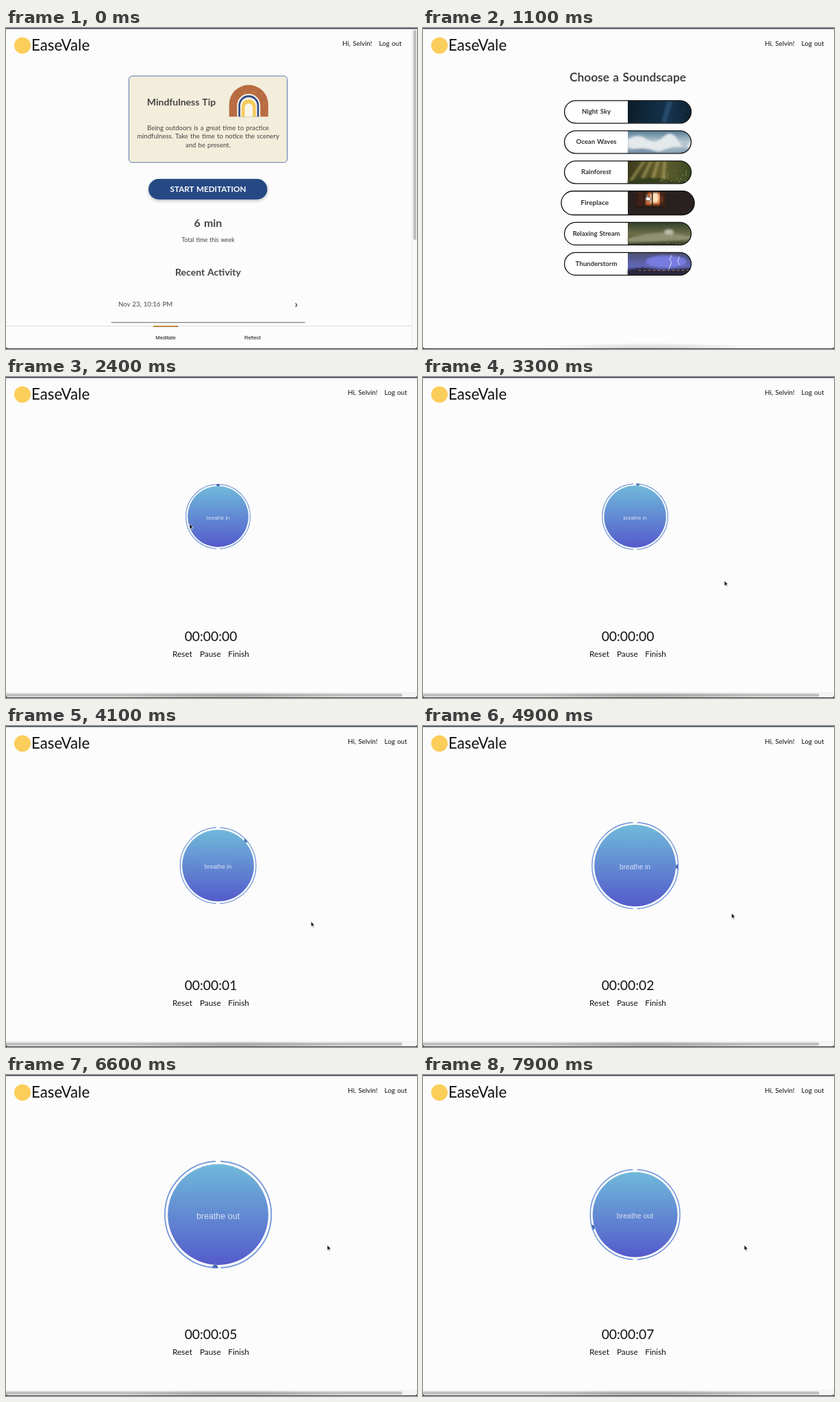
These frames come from a looping animation (600 by 468 pixels, 8000 ms). An HTML page:

```html
<!DOCTYPE html>
<html lang="en">
<head>
<meta charset="utf-8">
<title>Meditation app</title>
<style>
  html, body { margin: 0; width: 100%; height: 100%; overflow: hidden; background: #fcfcfc; }
  svg { display: block; width: 600px; height: 468px; }
  text { font-family: Lato, "Open Sans", sans-serif; font-size: 9.6px; word-spacing: .07em; fill: #444; white-space: pre; }
  .mid { text-anchor: middle; }
  .bold { font-weight: 700; }
  .black { fill: #111; }
  .plain { font-family: "Liberation Sans", Arial, sans-serif; word-spacing: 0; }
</style>
</head>
<body>
<svg viewBox="0 0 600 468" xmlns="http://www.w3.org/2000/svg">
  <defs>
    <linearGradient id="orb" x1="0" y1="0" x2="0" y2="1">
      <stop offset="0" stop-color="#70b9da"/><stop offset="1" stop-color="#545bcb"/>
    </linearGradient>
    <linearGradient id="night"><stop offset="0" stop-color="#0c1c2b"/><stop offset=".65" stop-color="#15344f"/><stop offset="1" stop-color="#0d2231"/></linearGradient>
    <linearGradient id="ocean" x1="0" y1="0" x2="0" y2="1"><stop offset="0" stop-color="#557d96"/><stop offset=".5" stop-color="#b9c8d1"/><stop offset="1" stop-color="#8ba3b4"/></linearGradient>
    <linearGradient id="forest"><stop offset="0" stop-color="#3a3a1b"/><stop offset=".5" stop-color="#65602e"/><stop offset="1" stop-color="#3c4a25"/></linearGradient>
    <linearGradient id="stream" x1="0" y1="0" x2="0" y2="1"><stop offset="0" stop-color="#33422b"/><stop offset=".5" stop-color="#6c6d49"/><stop offset="1" stop-color="#3d412b"/></linearGradient>
    <linearGradient id="storm" x1="0" y1="0" x2="0" y2="1"><stop offset="0" stop-color="#4a5070"/><stop offset=".6" stop-color="#6267b8"/><stop offset="1" stop-color="#2e2e4c"/></linearGradient>
    <radialGradient id="shade"><stop offset="0" stop-color="#000" stop-opacity=".2"/><stop offset="1" stop-color="#000" stop-opacity="0"/></radialGradient>
    <filter id="soft" x="-10%" y="-30%" width="120%" height="180%">
      <feDropShadow dx="0" dy="2" stdDeviation="2" flood-opacity=".25"/>
    </filter>
    <filter id="haze" x="-30%" y="-60%" width="160%" height="220%"><feGaussianBlur stdDeviation="1.6"/></filter>
    <clipPath id="pill"><rect x="-92.5" width="185" height="33" rx="16.5"/></clipPath>
    <clipPath id="disc"><circle r="1.008"/></clipPath>
  </defs>
  <rect width="600" height="468" fill="#fcfcfc"/>

  <g id="home">
    <rect x="179.5" y="70" width="231" height="126" rx="4.5" fill="#f2eedb" stroke="#5876b0"/>
    <text class="mid bold" x="256" y="113" style="font-size:14px">Mindfulness Tip</text>
    <g id="rainbow"></g>
    <text class="mid" x="295" y="148.5">Being outdoors is a great time to practice</text>
    <text class="mid" x="295" y="161.3">mindfulness. Take the time to notice the scenery</text>
    <text class="mid" x="295" y="174.1">and be present.</text>
    <rect x="208" y="220" width="173.5" height="30" rx="15" fill="#284a84" filter="url(#soft)"/>
    <text class="mid bold" x="295" y="239" style="font-size:11.7px;fill:#fff">START MEDITATION</text>
    <text class="mid bold" x="295" y="290" style="font-size:16px">6 min</text>
    <text class="mid" x="295" y="312" style="font-size:8.6px">Total time this week</text>
    <text class="mid bold" x="295" y="361.3" style="font-size:14px">Recent Activity</text>
    <text x="164" y="406">Nov 23, 10:16 PM</text>
    <path d="M422.8 401.2l1.6 2.8-1.6 2.8" fill="none" stroke="#222" stroke-width="1.2"/>
    <path d="M153.500 429.300H436.500" stroke="#666" stroke-width="1"/>
    <path d="M0 434.500H593" stroke="#ddd"/>
    <rect x="215" y="434" width="36.500" height="2" fill="#c08440"/>
    <text class="mid plain black" x="233" y="454" style="font-size:7.7px">Meditate</text>
    <text class="mid plain black" x="360" y="454" style="font-size:7.7px">Reflect</text>
    <rect x="592.500" y="1" width="7.500" height="466" fill="#f8f8f8"/>
    <path d="M592.500 1V467" stroke="#e6e6e6" stroke-width=".7"/>
    <rect x="594.500" y="3" width="4.500" height="306" rx="2.250" fill="#c0c0c0"/>
  </g>

  <g id="sounds">
    <text class="mid bold" x="299" y="78" style="font-size:17.3px">Choose a Soundscape</text>
    <g id="list"></g>
    <ellipse cx="330" cy="468" rx="170" ry="9" fill="url(#shade)"/>
  </g>

  <g id="timer">
    <g id="ring">
      <circle r=".945" fill="url(#orb)"/>
      <g clip-path="url(#disc)"><circle id="dot" r=".057" fill="#4565ad"/></g>
      <path id="arcs" fill="none" stroke="#6c92d8" stroke-width=".022"/>
    </g>
    <text id="breath" class="mid plain" style="fill:#fff;fill-opacity:.75"></text>
    <text id="clock" class="mid black" x="299" y="384.500" style="font-size:19.3px"></text>
    <text class="mid black" x="257.500" y="408" style="font-size:11.8px">Reset</text>
    <text class="mid black" x="298.300" y="408" style="font-size:11.8px">Pause</text>
    <text class="mid black" x="339.600" y="408" style="font-size:11.8px">Finish</text>
    <rect y="460" width="600" height="7" fill="#f5f5f5"/>
    <path d="M0 460H600" stroke="#e6e6e6" stroke-width=".7"/>
    <rect x="-4" y="461.500" width="582.500" height="4.500" rx="2.250" fill="#c0c0c0"/>
    <ellipse cx="330" cy="468" rx="170" ry="9" fill="url(#shade)"/>
  </g>

  <circle cx="24" cy="25.500" r="12" fill="#fbcd5a"/>
  <text class="black" x="37" y="33" style="font-size:22.3px">EaseVale</text>
  <g id="user">
    <text class="black" x="499" y="26" style="font-size:9.800px">Hi, Selvin!</text>
    <text class="black" x="552.500" y="26" style="font-size:9.800px">Log out</text>
  </g>
  <rect width="600" height="1.500" fill="#3f4a58"/>
  <path d="M0 465Q.5 467 3 467H597Q599.500 467 600 465V468H0Z" fill="#3a3d42"/>

  <g id="cursor">
    <path id="arrow" d="M0 0V7.600L1.800 6 3 8.800 4.200 8.300 3 5.600H5.400Z" fill="#111" stroke="#fff" stroke-width=".6"/>
    <path id="hand" d="M-.8 1.200Q-.8 0 0 0T.8 1.200V4L4.200 4.900Q5.600 5.300 5.300 6.800L4.500 10H-.4L-3 6.300Q-3.200 5.200-2 5.400L-.8 6.400Z" fill="#fff" stroke="#222" stroke-width=".8"/>
  </g>
</svg>
<script>
const LOOP = 8000, STEP = 100;
const OPEN_LIST = 700, OPEN_TIMER = 2300, START = 3207;
const SPEED = 1.5;      // app seconds per second on screen
const CYCLE = 10;       // app seconds per breath
const $ = id => document.getElementById(id);
const set = (el, name, value) => el.setAttribute(name, value);
const show = (id, on) => set($(id), 'display', on ? 'inline' : 'none');
const clamp = v => Math.max(0, Math.min(1, v));
const ramp = (t, a, b) => clamp((t - a) / (b - a));
const ease = v => v * v * (3 - 2 * v);

let seed = 7;
const rand = () => (seed = seed * 16807 % 2147483647) / 2147483647;
const specks = (n, x, y, w, h, color, r) => Array.from({ length: n }, () =>
  `<circle cx="${x + rand() * w}" cy="${y + rand() * h}" r="${r}" fill="${color}"/>`).join('');

// Rainbow: nested arches on one base line
const arch = ([half, top, color]) => {
  const cx = 354.3, base = 129.300, rise = Math.min(half, base - top);
  return `<path d="M${cx - half} ${base}V${top + rise}A${half} ${rise} 0 0 1 ${cx + half} ${top + rise}V${base}Z" fill="${color}"/>`;
};
const band = [28.5, 83, '#b96b41'];
$('rainbow').innerHTML = arch(band) +
  specks(16, 332, 88, 44, 10, '#e5c3a0', .4) + specks(8, 328, 104, 8, 23, '#e5c3a0', .4) +
  specks(8, 373, 104, 8, 23, '#e5c3a0', .4) +
  [[17, 96, '#f8f5ea'], [15, 98, '#334d86'], [12.300, 101, '#f8f5ea'],
   [10.500, 104, '#f6cb5c'], [5.800, 110, '#f8f5ea']].map(arch).join('');

// Simple scenes, 93 by 33, for the right half of each pill
const fill = color => `<rect width="93" height="33" fill="${color}"/>`;
const blur = body => `<g filter="url(#haze)">${body}</g>`;
const rays = [0, 1, 2, 3, 4].map(i =>
  `<path d="M${22 + i * 10} 0l4 0-${20 - i * 6} 30-5 0Z" fill="#c0b56b" opacity=".55"/>`).join('');
const scenes = [
  ['Night Sky', fill('url(#night)') + blur('<path d="M62 0L52 33" stroke="#355a80" stroke-width="7" opacity=".6"/>') +
    specks(24, 2, 2, 88, 29, '#6d8dac', .35)],
  ['Ocean Waves', fill('url(#ocean)') + blur('<path d="M0 13Q14 3 27 12T52 9 74 15 93 12V25Q70 20 52 28T0 24Z" fill="#e4e9ec"/><path d="M0 29Q20 22 42 30T93 26V33H0Z" fill="#7893a8"/>')],
  ['Rainforest', fill('url(#forest)') + blur(rays + '<path d="M0 29Q30 20 60 28T93 24V33H0Z" fill="#333d1b"/>') +
    specks(22, 48, 14, 42, 17, '#a5a760', .7)],
  ['Fireplace', fill('#29211f') + '<rect x="10" width="42" height="23" fill="#3e2218"/>' +
    blur('<path d="M25 19Q22 10 29 2H45Q50 12 45 19Z" fill="#d46a2d"/><path d="M31 16Q30 7 35 2H41Q45 10 41 16Z" fill="#ffe4bb"/>') +
    '<path d="M12 0V22M23 0V22M34 0V22M46 0V22M10 22H52" stroke="#241918" stroke-width="1.500"/>'],
  ['Relaxing Stream', fill('url(#stream)') + blur('<path d="M0 23Q35 14 58 15L93 20V25Q60 28 0 29Z" fill="#8f9173"/><ellipse cx="60" cy="14" rx="7" ry="4" fill="#b9bca5"/>') +
    specks(24, 0, 18, 92, 14, '#8b8654', .8)],
  ['Thunderstorm', fill('url(#storm)') + blur('<ellipse cx="56" cy="13" rx="30" ry="9" fill="#777ce0"/><path d="M0 25L22 22 48 26 93 23V33H0Z" fill="#26283c"/>') +
    '<path d="M64 4l-3 6 3 4-4 10M75 6l-2 7 2 5" fill="none" stroke="#dfe2ff"/><path d="M16 26H88" stroke="#c87742" stroke-dasharray="3 4"/>']
];
$('list').innerHTML = scenes.map(([name, art]) => `<g>
  <g clip-path="url(#pill)"><rect x="-93" width="186" height="33" fill="#fff"/>${art}</g>
  <rect x="-92.500" width="185" height="33" rx="16.500" fill="none" stroke="#111" stroke-width="1.300"/>
  <text class="mid bold" x="-46" y="19.300" style="fill:#333">${name}</text></g>`).join('');
const pills = [...$('list').children];

// Two half circles with small openings at top and bottom
const gap = 2.75 * Math.PI / 180, gx = Math.sin(gap), gy = Math.cos(gap);
set($('arcs'), 'd', `M${gx} ${-gy}A1 1 0 0 1 ${gx} ${gy}M${-gx} ${gy}A1 1 0 0 1 ${-gx} ${-gy}`);

const path = [
  [100, 430, 310], [500, 322, 238], [700, 322, 238], [1100, 327, 242], [1400, 320, 243],
  [1900, 269.500, 224.500], [2150, 268, 212], [2400, 268, 214], [3000, 327, 403],
  [3200, 327, 403], [3300, 440, 297], [4900, 450.500, 273], [6100, 469, 248]
];
function cursorAt(t) {
  const i = path.findIndex(p => p[0] > t);
  if (i < 0) return path[path.length - 1].slice(1);
  if (i === 0) return path[0].slice(1);
  const [a, x, y] = path[i - 1], [b, u, v] = path[i], k = ease(ramp(t, a, b));
  return [x + (u - x) * k, y + (v - y) * k];
}

function drawList(t) {
  const hover = [0, 0, ramp(t, 2000, 2200), ramp(t, 850, 1050) - ramp(t, 1600, 1800), 0, 0];
  let y = 105.800;
  pills.forEach((pill, i) => {
    const s = 1 + .05 * ease(hover[i]);
    set(pill, 'transform', `translate(299 ${y}) scale(${s})`);
    y += 33 * s + 11;
  });
}

function drawTimer(t) {
  const sec = Math.max(0, (t - START) / 1000 * SPEED);
  const phase = sec % CYCLE, half = CYCLE / 2;
  const radius = 47 + 6.25 * Math.min(phase, CYCLE - phase);
  const turn = phase / CYCLE * 2 * Math.PI;
  set($('ring'), 'transform', `translate(309.600 203.500) scale(${radius})`);
  set($('dot'), 'cx', Math.sin(turn));
  set($('dot'), 'cy', -Math.cos(turn));
  const label = $('breath');
  label.textContent = phase < half ? 'breathe in' : 'breathe out';
  set(label, 'transform', `translate(309.500 ${204.200 + radius * .072}) scale(${radius * .0161})`);
  label.style.fontSize = '10px';
  $('clock').textContent = '00:00:' + String(Math.floor(sec)).padStart(2, '0');
}

function render(t) {
  const home = t < OPEN_LIST, timer = t >= OPEN_TIMER;
  show('home', home);
  show('sounds', !home && !timer);
  show('timer', timer);
  set($('user'), 'transform', `translate(${home ? -8 : 0} 0)`);
  if (timer) drawTimer(t);
  else if (!home) drawList(t);
  const [x, y] = cursorAt(t);
  const pointing = t >= 400 && t < OPEN_TIMER || t >= 2900 && t < 3300;
  show('cursor', t >= 100);
  show('arrow', !pointing);
  show('hand', pointing);
  set($('cursor'), 'transform', `translate(${x} ${y})`);
}

const begin = performance.now();
function tick() {
  const t = (performance.now() - begin) % LOOP;
  render(Math.floor(t / STEP) * STEP);
  requestAnimationFrame(tick);
}
tick();
</script>
</body>
</html>
```
